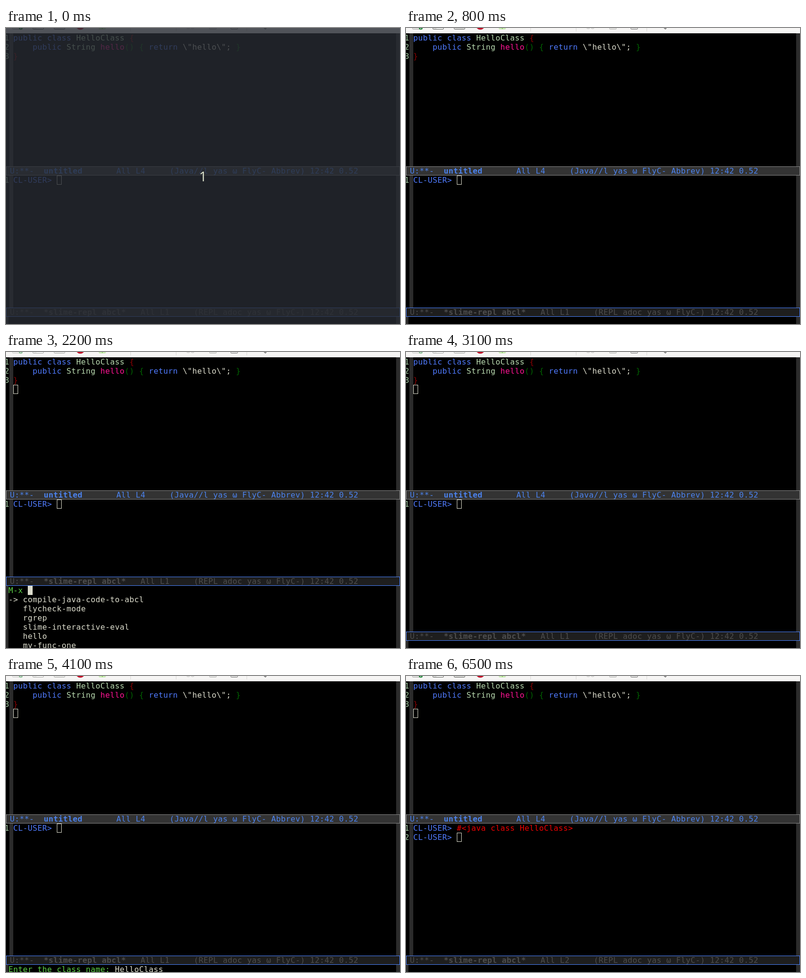
An HTML page that plays this animation: 814 px wide and 614 px high, repeating every 6600 ms.

```html
<!DOCTYPE html>
<html lang="en">
<head>
<meta charset="utf-8">
<title>Editor session</title>
<style>
  html, body { margin: 0; width: 100%; height: 100%; overflow: hidden; background: #000; }
  svg { display: block; width: 814px; height: 614px; }
  text { font: 16px "DejaVu Sans Mono", monospace; }
  .bold { font-weight: bold; }
  .count { font: 28px "Open Sans", sans-serif; }
</style>
</head>
<body>
<svg id="stage" viewBox="0 0 814 614" xmlns="http://www.w3.org/2000/svg"></svg>
<script>
const LOOP = 6600, CELL = 10, LINE = 19, ASCENT = 15;
const C = {
  fg: '#dcdccc', blue: '#507bff', type: '#b9dab0', pink: '#ff1493',
  red: '#8b0000', green: '#006400', num: '#9fc59f', prompt: '#5bd045',
  result: '#ee0000', fringe: '#2b2b2b', bar: '#4c83ee', dim: '#4d4d4d'
};
const stage = document.getElementById('stage');

const esc = s => s.replace(/&/g, '&amp;').replace(/</g, '&lt;');
const rect = (x, y, w, h, fill, more = '') =>
  `<rect x="${x}" y="${y}" width="${w}" height="${h}" fill="${fill}" ${more}/>`;
const frame = (x, y, w, h, fill, stroke) =>
  rect(x + .5, y + .5, w - 1, h - 1, fill, `stroke="${stroke}"`);

// One run of text on the character grid; top is the top of its line.
function put(x, top, str, fill, cls = '') {
  const xs = [...str].map((_, i) => x + i * CELL).join(' ');
  return `<text class="${cls}" x="${xs}" y="${top + ASCENT}" fill="${fill}">${esc(str)}</text>`;
}

// Runs given as [column, text, colour, class].
const runs = (x, top, list) =>
  list.map(([col, str, fill, cls]) => put(x + col * CELL, top, str, fill, cls)).join('');

function cursor(x, y, kind) {
  if (kind === 'solid') return rect(x, y, CELL, LINE, C.fg);
  return kind === 'box' ? frame(x, y, CELL, LINE, 'none', C.fg) : '';
}

function toolbar(pale) {
  const line = x => rect(x, 0, 1, 7, '#d8d7d5');
  const tray = (x, w, y, ink) =>
    `<path d="M${x} 0V${y - 1}Q${x} ${y} ${x + 1} ${y}H${x + w - 1}Q${x + w} ${y} ${x + w} ${y - 1}V0" fill="#e4e4e2" stroke="${ink}"/>`;
  const ring = x => `<circle cx="${x}" cy="-3" r="4.5" fill="none" stroke="#b4b4b2"/>`;
  return rect(0, 0, 814, 11, '#f6f5f4') +
    `<g opacity="${pale ? .5 : 1}">` +
    tray(13.5, 18, 2.5, '#a5a5a2') +
    '<circle cx="30.5" cy="-.5" r="4" fill="#21863a"/>' + rect(30, 0, 1, 2, '#fff') +
    tray(55.5, 22, 2.5, '#555753') + rect(63, 0, 13, 2, '#fff') +
    tray(99.5, 22, 2.5, '#555753') + '</g>' +
    '<circle cx="153.5" cy="-6" r="9.5" fill="#bf1027"/>' +
    '<path d="M191 0H207L205 3H193Z" fill="#c9eab4"/>' + rect(198, 0, 2, 2, '#8fca6c') +
    line(257) + line(351) + ring(376.5) + ring(385.5) +
    tray(420.5, 14, 2.5, '#b4b4b2') + tray(464.5, 14, 2.5, '#777') +
    line(497) + '<path d="M533 0L536 2L538 0" fill="none" stroke="#666" stroke-width="1.5"/>';
}

function modeline(y, ink, fill, edge, name, gap, pos, modes, modesCol) {
  return frame(0, y, 814, LINE, fill, edge) + runs(8, y, [
    [0, 'U:**-', ink], [7, name, ink, 'bold'], [gap, pos, ink],
    [modesCol, modes + ' 12:42 0.52', ink]
  ]);
}

function code() {
  return runs(15, 11, [
    [0, 'public class', C.blue], [13, 'HelloClass', C.type], [24, '{', C.red]
  ]) + runs(15, 30, [
    [4, 'public', C.blue], [11, 'String', C.type], [18, 'hello', C.pink],
    [23, '()', C.green], [26, '{', C.green], [28, 'return', C.blue],
    [35, '\\"hello\\";', C.fg], [46, '}', C.green]
  ]) + put(15, 49, '}', C.red) +
    [1, 2, 3].map((n, i) => put(-3, 11 + i * LINE, String(n), C.num)).join('');
}

function repl(done) {
  const row = n => put(-3, 287 + n * LINE, String(n), C.num) +
    put(15, 287 + n * LINE, 'CL-USER>', C.blue);
  if (!done) return row(1) + cursor(105, 306, 'box');
  return row(1) + put(105, 306, '#<java class HelloClass>', C.result) +
    row(2) + cursor(105, 325, 'box');
}

const commands = ['compile-java-code-to-abcl', 'flycheck-mode', 'rgrep',
  'slime-interactive-eval', 'hello', 'my-func-one'];

const minibuffer = {
  empty: () => '',
  list: s => put(5, 485, 'M-x', C.prompt) + cursor(45, 485, s.blink) +
    put(5, 504, '->', C.fg) +
    commands.map((c, i) => put(35, 504 + i * LINE, c, C.fg)).join(''),
  ask: s => put(5, 599, 'Enter the class name:', C.prompt) + cursor(225, 599, s.blink) +
    (s.typed ? put(225, 599, 'H', s.blink ? '#000' : C.fg) + put(235, 599, 'elloClass', C.fg) : ''),
  note: () => put(5, 599, 'You can run the command ‘compile-java-code-to-abcl’ with <f5> j', C.fg)
};

// Each step changes part of the state from its time on.
const steps = [
  [0, { shade: true, point: '', mini: 'empty', blink: '', typed: false, pale: false, done: false }],
  [100, { shade: false }],
  [300, { point: 'solid' }],
  [800, { point: '' }],
  [1200, { point: 'box', mini: 'list', blink: 'solid' }],
  [1300, { pale: true }],
  [1700, { blink: '' }],
  [2200, { blink: 'solid' }],
  [2700, { blink: '' }],
  [3100, { mini: 'empty' }],
  [3200, { mini: 'ask', blink: 'solid' }],
  [3600, { typed: true, blink: '' }],
  [3700, { blink: 'solid' }],
  [4100, { blink: '' }],
  [4300, { mini: 'empty', point: 'solid', pale: false }],
  [4400, { mini: 'note', done: true }],
  [6500, { mini: 'empty', point: 'box' }]
];

function draw(s) {
  const base = s.mini === 'list' ? 466 : 580;
  stage.innerHTML = rect(0, 0, 814, 614, '#000') + toolbar(s.pale) +
    rect(7, 11, 8, base - 11, C.fringe) + rect(806, 11, 8, 603, C.fringe) +
    rect(0, base + LINE, 5, 614 - base - LINE, C.fringe) +
    code() + cursor(15, 68, s.point) +
    modeline(287, C.bar, '#333', '#888', 'untitled', 22, 'All L4',
      '(Java//l yas ω FlyC- Abbrev)', 33) +
    repl(s.done) +
    modeline(base, C.dim, '#1e1e1e', '#4c83ff', '*slime-repl abcl*', 27,
      s.done ? 'All L2' : 'All L1', '(REPL adoc yas ω FlyC-)', 38) +
    minibuffer[s.mini](s) +
    (s.shade ? rect(0, 0, 814, 614, '#272b33', 'opacity=".8"') +
      '<text class="count" x="407" y="318" text-anchor="middle" fill="#dfe6cf">1</text>' : '');
}

let shown = -1;
function tick(now) {
  const t = now % LOOP;
  const past = steps.filter(([at]) => at <= t);
  if (past.length !== shown) {
    shown = past.length;
    draw(Object.assign({}, ...past.map(p => p[1])));
  }
  requestAnimationFrame(() => tick(performance.now() - start));
}
const start = performance.now();
tick(0);
</script>
</body>
</html>
```
